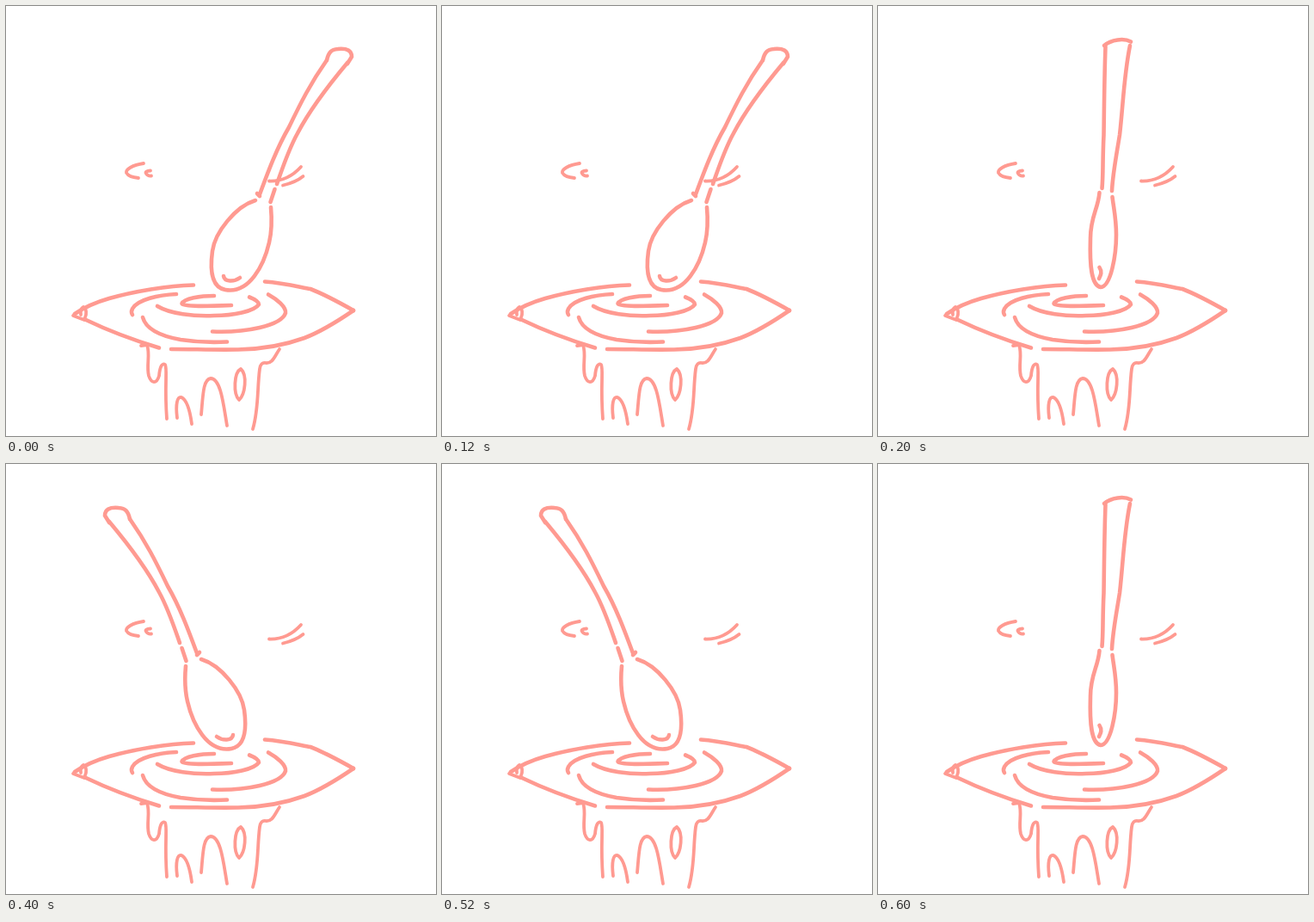
Animation of 500 by 500 pixels, one loop 0.8 s. Source, as an HTML page:

```html
<!DOCTYPE html>
<html lang="en">
<head>
<meta charset="utf-8">
<title>Stirring spoon</title>
<style>
  html, body { margin: 0; width: 100%; height: 100%; overflow: hidden; background: #fff; }
  svg { display: block; width: 100%; height: 100%; }
  path { fill: none; stroke: #ff9a91; stroke-width: 4.6; stroke-linecap: round; stroke-linejoin: round; }
  .thin path { stroke-width: 3.8; }
</style>
</head>
<body>
<svg viewBox="0 0 500 500">
  <g id="bowl">
    <path d="M218 324.5C188 325 148 332 120 340C106 344 93 349 80 358"/>
    <path d="M301 320.5C322 322 338 326 354 329C372 336 388 345 404 354"/>
    <path d="M404 354C385 367 368 378 347 386C325 394 300 399 270 399.500C242 400 218 399 192 399"/>
    <path d="M178 397.500C150 389 120 378 93 365"/>
    <path d="M198 335C178 336 153 341 147 352Q145 356 147 359"/>
    <path d="M159 362C163 377 181 384 203 388Q229 392 257 390.500"/>
    <path d="M176 349C191 358 218 361 242 360C264 360 289 355 294 347Q294 343 283 338.500"/>
    <path d="M242 337C226 337 207 340 204.500 346C207 350 235 349 262 348"/>
    <path d="M305 335.500C315 341 326 350 325 357C320 372 278 380 240 378.500"/>
  </g>
  <g class="thin">
    <path d="M80 358L78 360L91 365L93 359Q94 352 90 350Q86 352 87 359"/>
    <path d="M160 183C147 185 139 190 140 194C142 198 147 199 154 200"/>
    <path d="M168 191.500Q161 192 163 195Q165 198 169 197.500"/>
    <path d="M306 203.500C321 204 334 197 343 187"/>
    <path d="M322 208.500Q337 205 345.500 198"/>
    <path d="M157 395L164 394C168 406 163 417 166 430C169 439 175 440 178 430C179 418 182 415 185 417C188 421 184 440 187 480"/>
    <path d="M199 479C197 463 199 454 204 455C210 458 214 471 216 486"/>
    <path d="M227 475C229 454 229 434 238 433C250 433 253 465 257 488"/>
    <path d="M273 422C265 426 264 451 271 458C278 452 281 429 273 422Z"/>
    <path d="M318 399C312 408 310 416 302 415Q296 414 295 422C292 444 294 468 287 492"/>
  </g>
  <g id="tilted">
    <path d="M373 63C375 54 378 50.500 386 50C397 49 402 52 402 59L397 67"/>
    <path d="M373 63C354 90 343 112 329 141C315 165 305 192 295 219"/>
    <path d="M397 66C371 97 352 123 339 148C328 168 321 190 315 207"/>
    <path d="M292 218L295 221M312.500 213L307.500 228"/>
    <path d="M290 226C267 233 243 263 240 285C237 307 239 327 255 330C283 335 300 301 306 275C310 258 309 245 308 234"/>
    <path d="M253 314C254 321 265 321 272 316"/>
  </g>
  <g id="upright">
    <path d="M263 46C271 39 286 37 294 41.500"/>
    <path d="M264.500 47C263 90 263 120 262.500 150C261 180 262 195 260.500 212"/>
    <path d="M293 46C286 80 285 115 281 150C277 175 273 195 272 215"/>
    <path d="M257.500 217C256 236 247 245 247 270C246 302 248 325 259 327C271 326 277 289 277 266C277 247 274 235 272.500 222"/>
    <path d="M257.500 304C261 309 259 313 257 317"/>
  </g>
</svg>
<script>
  const STEP = 200;
  const poses = ['right', 'middle', 'left', 'middle'];
  const tilted = document.getElementById('tilted');
  const upright = document.getElementById('upright');
  const start = performance.now();

  function draw(time) {
    const pose = poses[Math.floor(time / STEP) % poses.length];
    const middle = pose === 'middle';
    upright.style.display = middle ? '' : 'none';
    tilted.style.display = middle ? 'none' : '';
    // The left pose is the right pose mirrored about the bowl's centre.
    tilted.setAttribute('transform', pose === 'left' ? 'matrix(-1 0 0 1 517 1)' : '');
  }

  function tick() {
    draw(performance.now() - start);
    requestAnimationFrame(tick);
  }
  tick();
</script>
</body>
</html>
```
